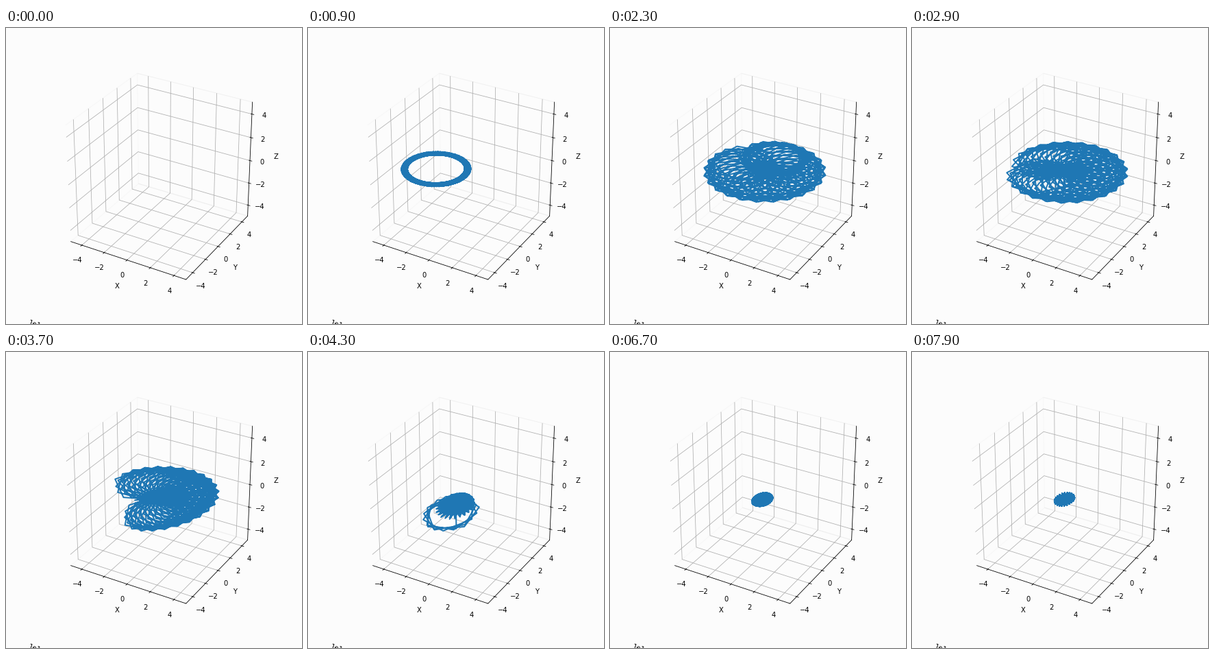
These frames come from a looping animation (432x432 px, 8000 ms). A matplotlib script:

```python
import numpy as np
import matplotlib.pyplot as plt
from matplotlib.animation import FuncAnimation

FRAMES, STEP_MS = 80, 100
PER_FRAME = 60            # samples added each frame
TRAIL = 372               # samples kept on screen
SETTLE = 3720             # ms, big loops collapse here
PAPER = "#fcfcfc"

plt.rcParams.update({"font.family": "DejaVu Sans", "font.size": 10})


def trajectory():
    """Loops around a centre that circles the origin, then collapses."""
    t = np.arange(FRAMES * PER_FRAME) * STEP_MS / PER_FRAME
    settled = t > SETTLE

    # whirl: wide loops that shrink a little and tip over at the end
    ease = np.clip((t - 3000) / 700, 0, 1) ** 2
    wide = 2.6 - 0.6 * ease

    # settle: small loops that decay towards a fixed ring
    small = 0.75 + 0.71 * np.exp(-(t - SETTLE) / 800)

    radius = np.where(settled, small, wide)
    reach = np.where(settled, 1.14 * small - 0.53, 2.0 - 0.1 * ease)
    heading = np.radians(np.interp(
        t, [1100, 1800, 2280, 2900, 3700], [180, 57, -213, -526, -840]))

    # turn per sample: wide turns fill the loop with chords
    spread = np.minimum(1, ((t - 5300) / 1300) ** 2)
    turn = np.where(settled, 45 + 120 * spread, 68)
    phase = np.cumsum(np.radians(turn))

    side = reach * np.cos(heading) + radius * np.cos(phase)
    away = reach * np.sin(heading) + radius * np.sin(phase)
    lift = 0.4 * np.clip(1 - t / SETTLE, 0, 1)
    z = lift + ease * (0.15 * away + 0.2 * side)

    # turn from viewer-aligned axes to data axes (azimuth -60)
    c, s = np.cos(np.pi / 6), np.sin(np.pi / 6)
    return c * side - s * away, s * side + c * away, z


fig = plt.figure(figsize=(6, 6), dpi=72, facecolor=PAPER)
fig.subplots_adjust(left=0.125, right=0.9, bottom=0.124, top=0.879)
ax = fig.add_subplot(projection="3d", facecolor=PAPER)
ax.set_box_aspect((1, 1, 1))
ax.view_init(elev=30, azim=-60)
ax.set(xlim=(-5, 5), ylim=(-5, 5), zlim=(-5, 5),
       xlabel="X", ylabel="Y", zlabel="Z")
for axis in (ax.xaxis, ax.yaxis, ax.zaxis):
    axis.set_ticks(range(-4, 5, 2))
    axis.pane.set_fill(False)

# scale note, mostly below the bottom edge
fig.text(32.2 / 432, -1 / 432, "1e1", rotation=-18,
         rotation_mode="anchor", ha="left", va="baseline")

xs, ys, zs = trajectory()
line, = ax.plot([], [], [], color="#1f77b4", lw=2)


def update(frame):
    end = frame * PER_FRAME
    span = slice(max(0, end - TRAIL), end)
    line.set_data_3d(xs[span], ys[span], zs[span])
    return line,


anim = FuncAnimation(fig, update, frames=FRAMES, interval=STEP_MS,
                     init_func=lambda: update(0), repeat=True,
                     repeat_delay=0, blit=False)
plt.show()
```
